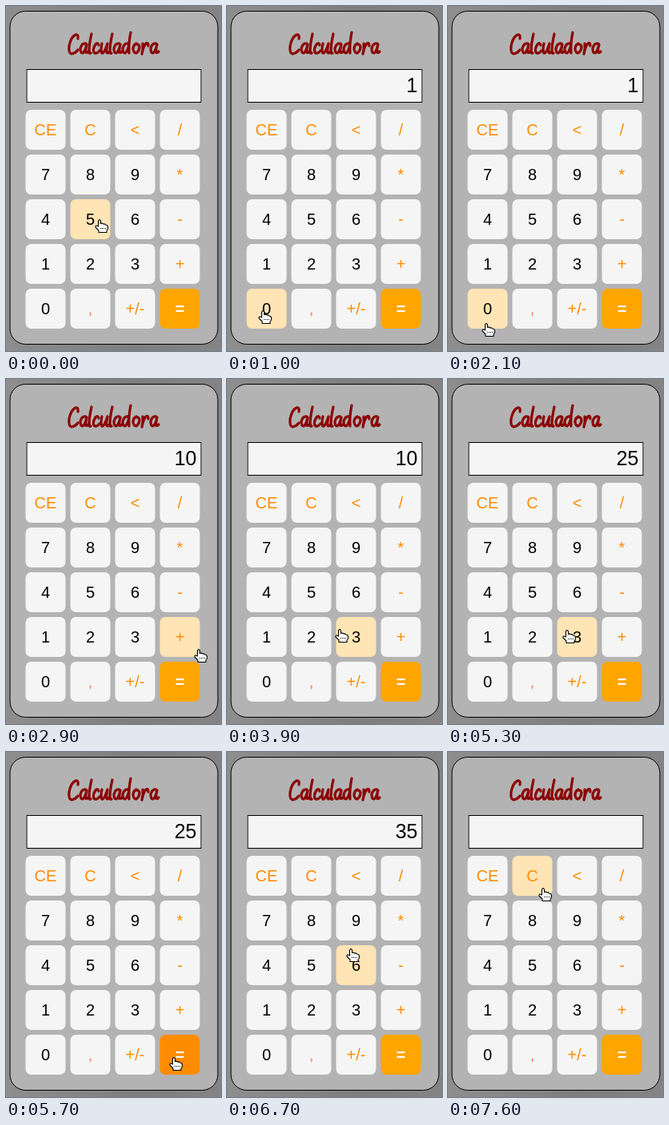
An HTML page that plays this animation: 269x432 px, repeating every 8000 ms.

```html
<!DOCTYPE html>
<html lang="es">
<head>
<meta charset="utf-8">
<title>Calculadora</title>
<style>
  html, body { margin: 0; width: 100%; height: 100%; overflow: hidden; }
  body {
    position: relative; background: linear-gradient(to right, #8e8e8e, #7e7e7e 60%, #848484);
    font-family: "Liberation Sans", Arial, sans-serif;
  }
  .calc, .case, .title, .display, .key, .pointer { position: absolute; box-sizing: border-box; }
  .calc { inset: 0; transform: translateX(-.5px); }
  .case { left: 5px; top: 6px; width: 261px; height: 418px; background: #b3b3b3; border: 1px solid #000; border-radius: 20px; }
  .title { left: 0; top: 0; margin: 0; }
  .title path { fill: none; stroke: #8b0000; stroke-width: 3.2; stroke-linecap: round; stroke-linejoin: round; }
  .display {
    left: 26px; top: 79px; width: 219px; height: 42px; padding-right: 5px;
    background: #f5f5f5; border: 1px solid #000;
    font-size: 25px; line-height: 39px; text-align: right;
  }
  .key {
    width: 50px; height: 50px; border-radius: 7px; background: #f5f5f5; color: #000;
    font-size: 20px; line-height: 50px; text-align: center;
  }
  .key.op { color: #ff8c00; }
  .key.comma { color: #ff7f50; }
  .key.hover { background: #ffe4b5; }
  .key.equals { background: #ffa500; color: #fff; font-weight: bold; }
  .key.equals.hover { background: #ff8c00; }
  .pointer { left: 0; top: 0; width: 20px; height: 20px; overflow: visible; }
  .pointer path { fill: #fff; stroke: #000; stroke-width: 1.1; stroke-linejoin: round; }
  .pointer .dots { fill: none; stroke-width: 1; stroke-dasharray: 1 1; }
</style>
</head>
<body>
<div class="calc">
  <div class="case"></div>
  <div class="display"></div>
</div>
<h1 class="title" aria-label="Calculadora"><svg width="269" height="75" aria-hidden="true"></svg></h1>
<svg class="pointer" aria-hidden="true">
  <g class="hand" transform="translate(-6)">
    <path d="M4.500 9V2Q6-.8 7.500 2V5.500Q9.500 4.500 10.500 6Q12.500 5.500 13.500 7Q16.500 7 16.500 10V12L15 14V16.500H5V14L1 10Q.5 6.500 4.500 9Z"/>
    <path class="dots" d="M7 11.500H14"/>
  </g>
  <path class="arrow" d="M.5.7V16L4 13L6.500 18.500L9 17.500L6.500 12H11.500Z"/>
</svg>
<script>
const LOOP = 8000, TICK = 100;
const labels = ["CE", "C", "<", "/", "7", "8", "9", "*", "4", "5", "6", "-", "1", "2", "3", "+", "0", ",", "+/-", "="];
const readings = [[0, ""], [700, "1"], [2400, "10"], [4400, "2"], [5100, "25"], [6100, "35"], [7600, ""]];

// Pointer glides: start time, ticks taken, where it ends
const glides = [
  [0, 1, 117, 267], [100, 4, 49, 325],
  [1000, 1, 45, 381], [1100, 3, 49, 404],
  [2100, 2, 46, 390], [2400, 1, 45, 389],
  [2900, 1, 241, 338], [3000, 1, 245, 336], [3100, 3, 228, 326],
  [3900, 1, 141, 313], [4000, 3, 112, 320],
  [4400, 3, 111, 286], [4700, 2, 110, 270],
  [5100, 7, 210, 382], [5800, 2, 225, 384], [6300, 1, 223, 384],
  [6500, 5, 118, 171], [7300, 1, 119, 170]
];

// Handwritten letters: advance and pen stroke
const bowl = "M8 1Q3 0 1 7Q1 13 4 13Q7 11 9 2";
const glyphs = {
  C: [14, "M12-5Q13-11 9-10Q3-7 1 4Q0 13 4 14Q9 13 12 9"],
  a: [11, bowl + "Q7 10 8 12Q9 13 11 11"],
  l: [5, "M4-11Q1 2 1 10Q1 14 3 13"],
  c: [10, "M8 3Q7-1 4 2Q0 8 2 12Q5 15 9 10"],
  u: [11, "M2 1Q0 10 2 13Q5 14 9 1Q7 10 8 12Q9 14 10 12"],
  d: [13, bowl + "M11-13Q8 2 9 13"],
  o: [11, "M5 1Q1 3 1 8Q2 13 5 13Q9 10 9 5Q8 1 4 2"],
  r: [11, "M2 1Q3 7 1 14Q3 4 6 1Q9-1 9 4"]
};

const find = s => document.querySelector(s);
const calc = find(".calc"), display = find(".display"), pointer = find(".pointer");
const hand = find(".hand"), arrow = find(".arrow");

let pen = 78, word = "";
for (const letter of "Calculadora") {
  const [advance, stroke] = glyphs[letter];
  word += `<path transform="translate(${pen} 46)" d="${stroke}"/>`;
  pen += advance;
}
find(".title svg").innerHTML = word;

const keys = labels.map((label, i) => {
  const el = document.createElement("div");
  const x = 25 + i % 4 * 56, y = 130 + Math.floor(i / 4) * 56;
  el.className = "key";
  if (!/\d/.test(label)) el.classList.add(label === "=" ? "equals" : label === "," ? "comma" : "op");
  el.textContent = label;
  el.style.left = x + "px";
  el.style.top = y + "px";
  calc.append(el);
  return { el, x, y };
});

const ease = u => u * u * (3 - 2 * u);
const indexAt = (list, t) => list.findLastIndex(item => item[0] <= t);

function pointerAt(t) {
  const i = indexAt(glides, t);
  const [start, ticks, x, y] = glides[i];
  const [, , x0, y0] = glides[Math.max(i - 1, 0)];
  const u = ease(Math.min(((t - start) / TICK + 1) / ticks, 1));
  return [x0 + (x - x0) * u, y0 + (y - y0) * u].map(Math.round);
}

function draw(now) {
  const t = Math.floor(now % LOOP / TICK) * TICK;
  const [px, py] = pointerAt(t);
  let over = false;
  for (const { el, x, y } of keys) {
    const hit = px >= x && px < x + 50 && py >= y && py < y + 44;
    el.classList.toggle("hover", hit);
    over = over || hit;
  }
  hand.style.display = over ? "" : "none";
  arrow.style.display = over ? "none" : "";
  pointer.style.transform = `translate(${px}px, ${py}px)`;
  display.textContent = readings[indexAt(readings, t)][1];
}

const begin = performance.now();
function frame() {
  draw(performance.now() - begin);
  requestAnimationFrame(frame);
}
frame();
</script>
</body>
</html>
```
